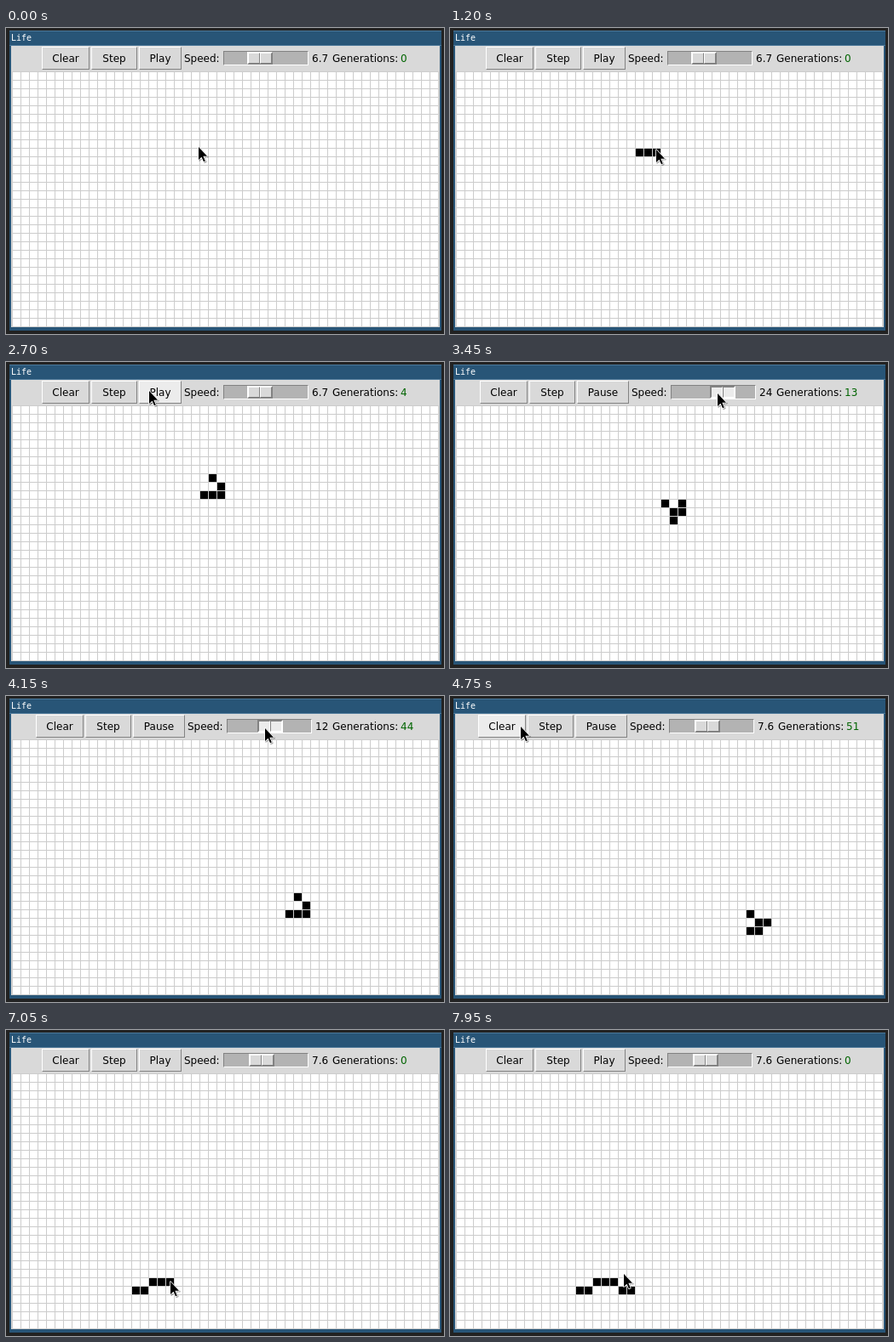
Write an HTML page that moves like this. It is 514 px wide and 360 px high and loops after 8000 ms.

```html
<!DOCTYPE html>
<html lang="en">
<head>
<meta charset="utf-8">
<title>Life</title>
<style>
  html, body { margin: 0; width: 100%; height: 100%; overflow: hidden; background: #222; }
  #stage { position: relative; width: 514px; height: 360px; overflow: hidden; background: #222;
    font: 12px "DejaVu Sans", sans-serif; color: #000; --light: #fff; --dark: #828282; }
  #stage div, svg { position: absolute; box-sizing: border-box; white-space: pre; }
  #frame { left: 4px; top: 3px; width: 507px; height: 353px; background: #285577; }
  #bar { left: 4px; top: 3px; width: 507px; height: 18px; border: solid #4c7899; border-width: 1px 0; }
  #title { left: 6px; top: 4px; color: #fff; font: 10px/16px "DejaVu Sans Mono", monospace; }
  #panel { left: 6px; top: 21px; width: 503px; height: 331px; background: #d9d9d9; }
  .label { top: 23px; line-height: 27px; }
  .bevel { border: 1px solid; background: #d9d9d9;
    border-color: var(--light) var(--dark) var(--dark) var(--light); }
  .sunken { --light: #828282 !important; --dark: #fff !important; }
  .button { top: 22px; height: 27px; line-height: 27px; text-align: center; }
  .hover, .hover .bevel { background: #ececec; }
  #trough { top: 27px; width: 100px; height: 17px; background: #b3b3b3;
    border: 1px solid; border-color: #828282 #fff #fff #828282; }
  #thumb { top: 0; width: 30px; height: 15px; }
  .half { top: 0; width: 14px; height: 13px; }
  .half + .half { left: 14px; }
  svg { left: 0; top: 0; }
  #cursor { filter: drop-shadow(1px 1px 0.5px rgba(0, 0, 0, .35)); }
</style>
</head>
<body>
<div id="stage">
  <div id="frame"></div>
  <div id="bar"></div>
  <div id="title">Life</div>
  <div id="panel"></div>
  <div id="clear" class="button bevel">Clear</div>
  <div id="step" class="button bevel">Step</div>
  <div id="play" class="button bevel">Play</div>
  <div id="speed" class="label">Speed:</div>
  <div id="trough">
    <div id="thumb" class="bevel"><div class="half bevel"></div><div class="half bevel"></div></div>
  </div>
  <div id="value" class="label"></div>
  <div id="caption" class="label">Generations:</div>
  <div id="count" class="label" style="color: #006400"></div>
  <svg width="514" height="360">
    <defs>
      <pattern id="grid" x="7" y="51" width="10" height="10" patternUnits="userSpaceOnUse">
        <path d="M0 0H10V1H1V10H0Z" fill="#ccc" shape-rendering="crispEdges"/>
      </pattern>
    </defs>
    <rect x="7" y="51" width="501" height="301" fill="#fff"/>
    <rect x="7" y="51" width="501" height="301" fill="url(#grid)"/>
    <path id="cells" shape-rendering="crispEdges"/>
    <path id="cursor" d="M0 0V15L3.5 11.7L6 17.2L7.8 16.4L5.4 10.8H10Z"
      stroke="#fff" stroke-width="1.6" stroke-linejoin="round" paint-order="stroke"/>
  </svg>
</div>
<script>
const LOOP = 8000, TICK = 50;
const START = 2800, GRAB = 3150, RELEASE = 4200, CLEARED = 5050;
const START_LEVEL = 0.826; // log10 of the first speed
const PACE = 1.534;        // playback runs faster than the game's clock
const el = Object.fromEntries([...document.querySelectorAll("[id]")].map(e => [e.id, e]));

const home = [226, 140];
// from, until, x, y: eased moves of the pointer
const moves = [
  [350, 600, 235, 145], [650, 1000, 242, 144], [1150, 1550, 234, 128],
  [1850, 2100, 126, 36], [2500, 2700, 168, 34], [2800, GRAB, 296, 36],
  [GRAB, 3650, 324, 38], [3650, 4100, 304, 38], [4150, 4650, 83, 36],
  [CLEARED, 5650, 154, 307], [5800, 5900, 162, 306], [6050, 6250, 174, 298],
  [6400, 6600, 183, 296], [6750, 6900, 193, 296], [7050, 7250, 203, 305],
  [7400, 7500, 214, 306], [7700, 7950, 204, 287]
];
const clicks = {
  step: [2150, 2250, 2350, 2500],
  play: [START],
  clear: [CLEARED],
  board: [250, 650, 1000, 1350, 1850, 5800, 6050, 6400, 6750, 7050, 7400, 7700]
};

function pointer(t) {
  let [x, y] = home;
  for (const [from, until, toX, toY] of moves) {
    if (t <= from) break;
    const u = Math.min(1, (t - from) / (until - from)), s = u * u * (3 - 2 * u);
    x += (toX - x) * s;
    y += (toY - y) * s;
  }
  return [x, y];
}

// The slider is logarithmic, 33 px per decade, and follows the drag.
function speedLevel(t) {
  const at = Math.min(Math.max(t, GRAB), RELEASE);
  return START_LEVEL + (pointer(at)[0] - pointer(GRAB)[0]) / 33;
}

function generation(t) {
  if (t >= CLEARED) return 0;
  const steps = clicks.step.filter(c => c <= t).length;
  if (t < START) return steps;
  let gen = steps + 1;
  for (let at = START; at < t; at += TICK) gen += PACE * 10 ** speedLevel(at) * TICK / 1000;
  return Math.floor(gen);
}

function cellAt(t) {
  const [x, y] = pointer(t);
  return [Math.floor((x - 7) / 10), Math.floor((y - 49) / 10)];
}

function evolve(cells) {
  const near = new Map(), alive = new Set(cells.map(String));
  for (const [x, y] of cells)
    for (let dx = -1; dx <= 1; dx++)
      for (let dy = -1; dy <= 1; dy++) {
        const key = [x + dx, y + dy].join();
        near.set(key, (near.get(key) || 0) + 1);
      }
  return [...near]
    .filter(([key, n]) => n === 3 || (n === 4 && alive.has(key)))
    .map(([key]) => key.split(",").map(Number));
}

const painted = (from, until) => clicks.board.filter(c => c >= from && c <= until).map(cellAt);
const boards = [painted(0, CLEARED)];
while (boards.length <= 60) boards.push(evolve(boards[boards.length - 1]));

function place(node, x, width) {
  node.style.left = x + "px";
  if (width) node.style.width = width + "px";
}

function draw(t) {
  const gen = generation(t), count = String(gen);
  const running = t >= START && t < CLEARED;
  const level = speedLevel(t), rate = 10 ** level;
  const value = rate.toFixed(rate < 10 ? 1 : 0);
  const [x, y] = pointer(t).map(Math.round);

  // The toolbar stays centred as its labels change width.
  const playWidth = running ? 61 : 50, valueWidth = value.includes(".") ? 20 : 16;
  const left = Math.floor((514 - 351 - playWidth - valueWidth - 8 * count.length) / 2);
  const speedX = left + 117 + playWidth, troughX = speedX + 46, valueX = troughX + 104;
  const captionX = valueX + valueWidth + 4;

  const buttons = { clear: [left, 56], step: [left + 58, 54], play: [left + 114, playWidth] };
  for (const [id, [bx, w]] of Object.entries(buttons)) {
    place(el[id], bx, w);
    el[id].classList.toggle("hover", x >= bx && x < bx + w && y >= 22 && y < 49);
    el[id].classList.toggle("sunken", clicks[id].includes(t + TICK));
  }
  el.play.textContent = running ? "Pause" : "Play";

  const thumbX = Math.floor(33 * level), grip = x - troughX - 1 - thumbX;
  place(el.speed, speedX);
  place(el.trough, troughX);
  place(el.thumb, thumbX);
  el.thumb.classList.toggle("hover", grip >= 0 && grip < 30 && y >= 28 && y < 43);
  el.thumb.classList.toggle("sunken", t >= GRAB && t < RELEASE);
  place(el.value, valueX);
  el.value.textContent = value;
  place(el.caption, captionX);
  place(el.count, captionX + 80);
  el.count.textContent = count;

  const cells = gen ? boards[gen] : painted(t < CLEARED ? 0 : CLEARED, t);
  el.cells.setAttribute("d", cells.map(([c, r]) => `M${8 + 10 * c} ${52 + 10 * r}h9v9h-9z`).join(""));
  el.cursor.setAttribute("transform", `translate(${x} ${y})`);
}

const start = performance.now();
function frame() {
  const t = (performance.now() - start) % LOOP;
  draw(Math.floor(t / TICK) * TICK);
  requestAnimationFrame(frame);
}
frame();
</script>
</body>
</html>
```
